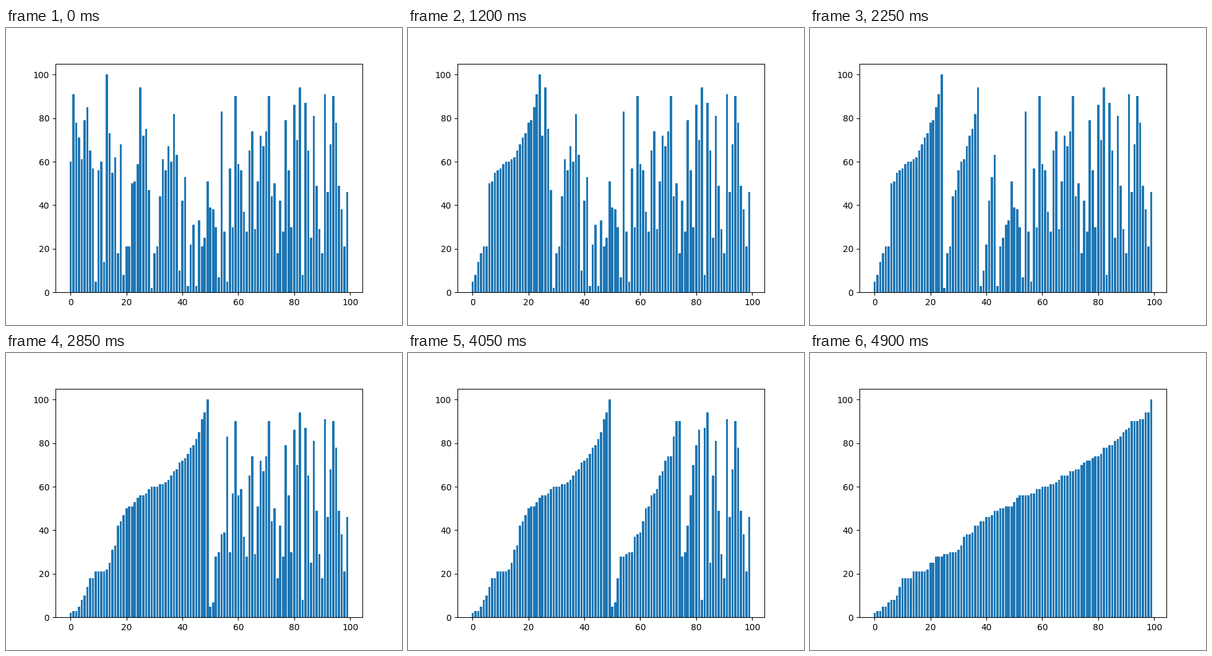
Write a matplotlib script that moves like this. It is 640 px wide and 480 px high and loops after 4.95 s.

```python
import matplotlib.pyplot as plt
from matplotlib.animation import FuncAnimation

VALUES = [
    60, 91, 78, 71, 61, 79, 85, 65, 57, 5, 56, 60, 14, 100, 73, 55, 62, 18, 68, 8,
    21, 21, 50, 51, 59, 94, 72, 75, 47, 2, 18, 21, 44, 61, 56, 67, 60, 82, 63, 10,
    42, 53, 3, 22, 31, 3, 33, 21, 25, 51, 39, 38, 30, 7, 83, 28, 5, 57, 30, 90,
    59, 56, 37, 28, 65, 74, 29, 51, 72, 67, 74, 90, 44, 50, 18, 42, 28, 79, 56, 30,
    86, 70, 94, 8, 87, 65, 25, 81, 49, 29, 18, 91, 46, 68, 90, 78, 49, 38, 21, 46,
]


def merge_sort(data, lo, hi):
    """Sort data[lo..hi] in place, yielding a snapshot after every merge."""
    if lo >= hi:
        return
    mid = (lo + hi) // 2
    yield from merge_sort(data, lo, mid)
    yield from merge_sort(data, mid + 1, hi)
    data[lo:hi + 1] = sorted(data[lo:hi + 1])
    yield data.copy()


steps = list(merge_sort(VALUES.copy(), 0, len(VALUES) - 1))

plt.rcParams["font.family"] = "DejaVu Sans"
fig, ax = plt.subplots(figsize=(6.4, 4.8), dpi=100)
bars = ax.bar(range(len(VALUES)), VALUES, color="#1f77b4")


def update(i):
    for bar, height in zip(bars, steps[i]):
        bar.set_height(height)
    return bars.patches


def init():
    return update(0)


anim = FuncAnimation(fig, update, frames=len(steps), init_func=init,
                     interval=50, repeat=True, repeat_delay=0)
plt.show()
```
